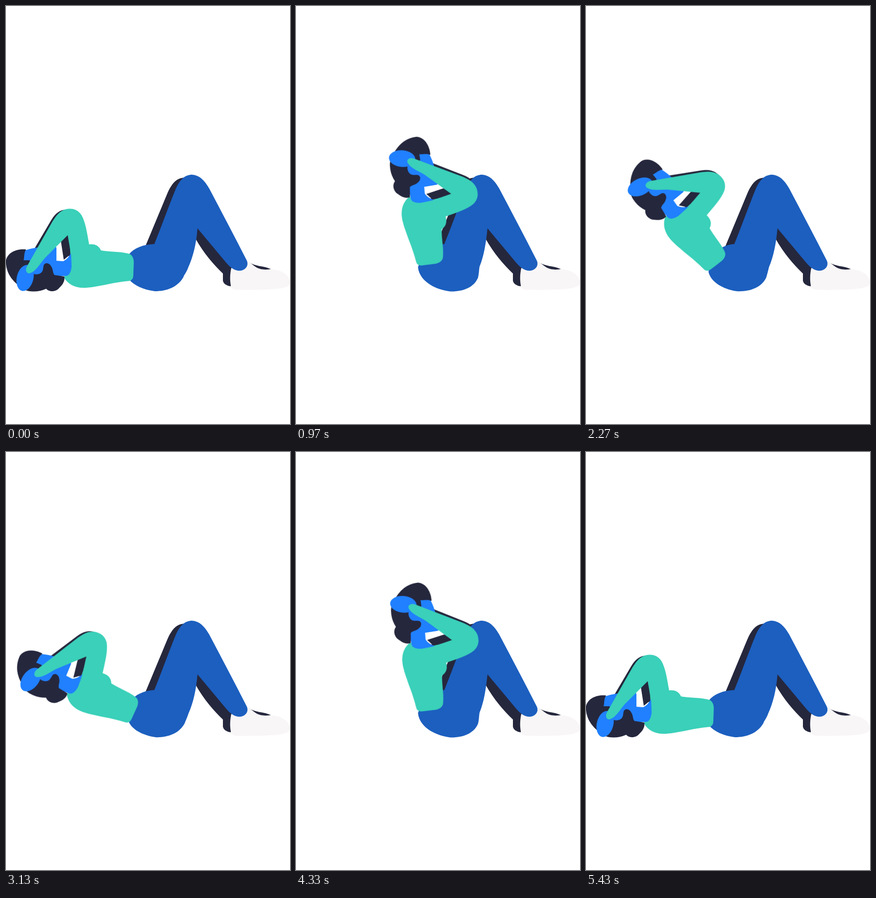
Recreate the animation shown at these times as an HTML page without scripts. Size 580 by 850 pixels, loop 5.46 s.

```html
<!DOCTYPE html>
<html lang="en">
<head>
<meta charset="utf-8">
<title>Sit-ups</title>
<style>
  html, body { margin: 0; width: 100%; height: 100%; overflow: hidden; background: #fff; }
  svg { display: block; width: 580px; height: 850px; }

  .dark { fill: #25273d; }
  .skin { fill: #2080ff; }
  .shirt { fill: #3ad0b9; }
  .pants { fill: #1c5fbf; }
  .shoe { fill: #f9f6f7; }

  :root {
    --flat: path("M391 452 C389 482 382 511 372 532 C369 541 364 546 362 552 C350 572 328 580 304 580 C280 577 262 568 252 557 L252 504 C262 492 280 485 303 484 Z");
    --bent: path("M391 452 C388 482 384 508 375 530 C374 536 374 547 372 553 C364 572 342 581 316 580.5 C290 578 252 562 249 530 L255 515 C272 496 288 485 303 484 Z");
  }

  .upper {
    transform-origin: 271px 536.5px;
    animation: curl 5460ms cubic-bezier(.37, 0, .63, 1) infinite;
  }
  .hips {
    d: var(--flat);
    animation: squash 5460ms cubic-bezier(.37, 0, .63, 1) infinite;
  }

  /* three reps: rise, short hold, lower, rest */
  @keyframes curl {
    0%, .55%, 27.62%, 34.25%, 61.32%, 67.95%, 95.02%, 100% { transform: rotate(0deg); }
    13.64%, 16.15%, 47.34%, 49.85%, 81.04%, 83.55% { transform: rotate(84.7deg); }
  }
  @keyframes squash {
    0%, .55%, 27.62%, 34.25%, 61.32%, 67.95%, 95.02%, 100% { d: var(--flat); }
    13.64%, 16.15%, 47.34%, 49.85%, 81.04%, 83.55% { d: var(--bent); }
  }
</style>
</head>
<body>
<svg viewBox="0 0 580 850">
  <!-- far arm -->
  <g class="upper">
    <path class="dark" d="M56 497 L92 436 C101 421 110 414 125 414 L150 430 L140 520 L128 508 L118 516 L113 484 L111 470 L62 518 Z"/>
  </g>

  <!-- far leg -->
  <path class="dark" d="M284 490 C300 452 314 418 330 380 C340 358 350 349 366 349 L380 360 L303 486 Z"/>
  <path class="dark" d="M387 473 C404 503 424 526 443 544 L443 559 Q445 568 459 570 L470 535 L391 448 Z"/>
  <path class="dark" d="M494 520 C508 530 526 528 541 535 L525 541 L500 535 Z"/>

  <!-- near leg -->
  <path class="shoe" d="M460 533 C457 547 457 561 460 572 Q463 577 472 577 C500 578 530 577 555 575 C572 573 580 569 580 562 C579 548 565 537 541 535 C528 537 518 536 509 530 L494 519 Z"/>
  <path class="pants" d="M303 484 C316 452 332 408 345 376 C355 351 367 343 380 343 C395 344 405 354 415 371 C441 420 468 471 492 518 C497 531 485 540 473 538 C462 536 455 528 448 520 L391 452 L375 520 L310 520 Z"/>
  <path class="pants hips"/>

  <!-- torso, head, near arm -->
  <g class="upper">
    <path class="shirt" d="M118 551 C125 565 140 573 158 573 C185 573 215 562 252 559 Q260 557 260 548 L261 520 Q260 505 248 503 C230 499 212 500 194 497 C190 488 182 483 169 485 L130 480 L133 530 Z"/>
    <path class="skin" d="M36 498 C50 493 62 491 75 490 C88 489 103 487 103 492 L103 518 L117 519 Q126 515 133 502 L134 530 Q132 548 122 549 L99 549 L60 562 L34 530 Z"/>
    <path class="dark" d="M41 495 C25 493 4 499 0 517 C-1 540 10 555 24 567 C34 581 60 585 82 575 C89 583 103 581 109 573 C116 567 121 558 119 550 L99 547 C95 543 97 536 92 529 C88 522 80 521 77 527 C75 535 77 541 67 545 C58 547 52 545 50 535 C50 528 52 524 48 517 L36 517 C38 510 36 503 41 495 Z"/>
    <ellipse class="skin" cx="39" cy="553" rx="17" ry="27" transform="rotate(14 39 553)"/>
    <path class="shirt" d="M170 486 C166 465 163 440 154 425 C146 412 132 411 123 413 C110 416 102 427 95 438 L43 529 C38 538 43 546 50 543 C60 540 69 525 79 513 L126 466 L134 512 L165 520 Z"/>
  </g>
</svg>
</body>
</html>
```
